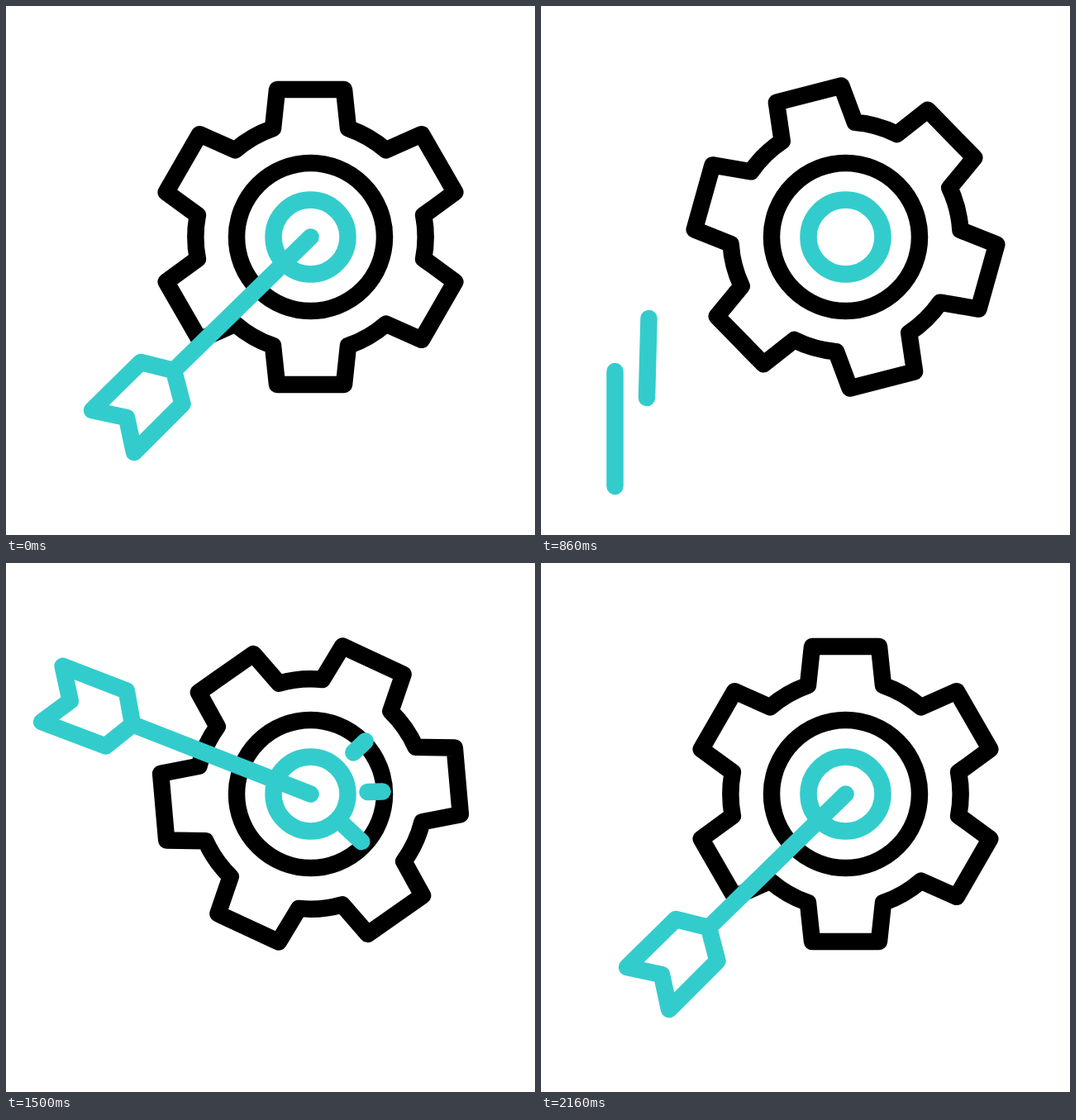
Animation, 640 px wide and 640 px high, one loop 2.36 s. Source, as an HTML page:

```html
<!DOCTYPE html>
<html lang="en">
<head>
<meta charset="utf-8">
<title>Gear and arrow</title>
<style>
  html, body { margin: 0; width: 100%; height: 100%; overflow: hidden; background: #fff; }
  svg { display: block; width: 100%; height: 100%; }
  g { fill: none; stroke-width: 20.5; stroke-linecap: round; stroke-linejoin: round; }
  .dark { stroke: #000; }
  .teal { stroke: #33cccc; }
</style>
</head>
<body>
<svg viewBox="0 0 640 640">
  <g transform="translate(368.5 279.5)">
    <g class="dark">
      <path id="gear"/>
      <circle r="89.5"/>
    </g>
    <g class="teal">
      <circle r="45"/>
      <path id="arrow" d="M0 0L-165.5 161.5L-205.5 151.5L-264.5 209.5L-222.5 218.5L-213.5 260.5L-155 202Z M0 0"/>
      <path id="sparks"/>
    </g>
  </g>
  <g class="teal"><path id="trails"/></g>
</svg>
<script>
const LOOP = 2360, STEP = 20;
const el = id => document.getElementById(id);
const gear = el('gear'), arrow = el('arrow'), sparks = el('sparks'), trails = el('trails');

const clamp = x => Math.min(1, Math.max(0, x));
const span = (t, from, to) => clamp((t - from) / (to - from));
const lerp = (a, b, k) => a + (b - a) * k;
const sineInOut = x => (1 - Math.cos(Math.PI * x)) / 2;

// Ease with horizontal end tangents; x1 and x2 set how long they reach
function bezier(x, x1, x2) {
  let lo = 0, hi = 1;
  for (let i = 0; i < 30; i++) {
    const s = (lo + hi) / 2, r = 1 - s;
    if (3 * x1 * s * r * r + 3 * x2 * s * s * r + s * s * s < x) lo = s; else hi = s;
  }
  return lo * lo * (3 - 2 * lo);
}

function gearPath() {
  const tooth = [[-45.5, -131.5], [-40.5, -178.5], [40.5, -178.5], [45.5, -131.5]];
  let d = '';
  for (let i = 0; i < 6; i++) {
    const c = Math.cos(i * Math.PI / 3), s = Math.sin(i * Math.PI / 3);
    tooth.forEach(([x, y], j) => {
      const cmd = j ? 'L' : i ? 'A139.2 139.2 0 0 1 ' : 'M';
      d += cmd + (x * c - y * s).toFixed(2) + ' ' + (x * s + y * c).toFixed(2);
    });
  }
  return d + 'A139.2 139.2 0 0 1 -45.5 -131.5Z';
}

// The part of a segment between fractions a and b
function trimmed([x1, y1, x2, y2], a, b) {
  if (b <= 0 || a >= 1) return '';
  return `M${lerp(x1, x2, a)} ${lerp(y1, y2, a)}L${lerp(x1, x2, b)} ${lerp(y1, y2, b)}`;
}

function gearAngle(t) {
  const spin = 205.5 * sineInOut(span(t, 257, 1442));
  return spin - 85.5 * bezier(span(t, 1450, 2160), 0.55, 0.213);
}

function arrowPose(t) {
  if (t < 1000) {
    const drop = 32 * Math.pow(Math.max(0, t - 250) / 170, 2.4);
    return [-0.00117 * drop * drop, drop, 0];
  }
  const away = Math.max(0, 1348 - t) * 2.7, tilt = 25.5 * Math.PI / 180;
  const turn = 70 * (1 - bezier(span(t, 1360, 2100), 0.553, 0.083));
  return [-away * Math.cos(tilt), -away * Math.sin(tilt), turn];
}

// angle, outer radius, delay
const SPARKS = [[-44, 92, 0], [-2, 87, 0], [43, 84.5, 41]];
const TRAILS = [[89.5, 442, 89.5, 581], [130.5, 378, 128, 474]];

function sparkPath(t) {
  return SPARKS.map(([deg, outer, delay]) => {
    const a = deg * Math.PI / 180, x = Math.cos(a), y = Math.sin(a);
    const line = [42 * x, 42 * y, outer * x, outer * y];
    return trimmed(line, span(t, 1440 + delay, 1540 + delay), span(t, 1350 + delay, 1440 + delay));
  }).join('');
}

function render(t) {
  const [x, y, turn] = arrowPose(t);
  gear.setAttribute('transform', `rotate(${gearAngle(t)})`);
  arrow.setAttribute('transform', `translate(${x} ${y}) rotate(${turn})`);
  sparks.setAttribute('d', sparkPath(t));
  trails.setAttribute('d', TRAILS.map(line =>
    trimmed(line, span(t, 860, 980), span(t, 680, 860))).join(''));
}

gear.setAttribute('d', gearPath());
arrow.setAttribute('d', 'M0 0L-165.5 161.5M-165.5 161.5L-205.5 151.5L-264.5 209.5' +
  'L-222.5 218.5L-213.5 260.5L-155 202Z');

let start = null;
function tick(now) {
  if (start === null) start = now;
  render(Math.floor(((now - start) % LOOP) / STEP) * STEP);
  requestAnimationFrame(tick);
}
render(0);
requestAnimationFrame(tick);
</script>
</body>
</html>
```
